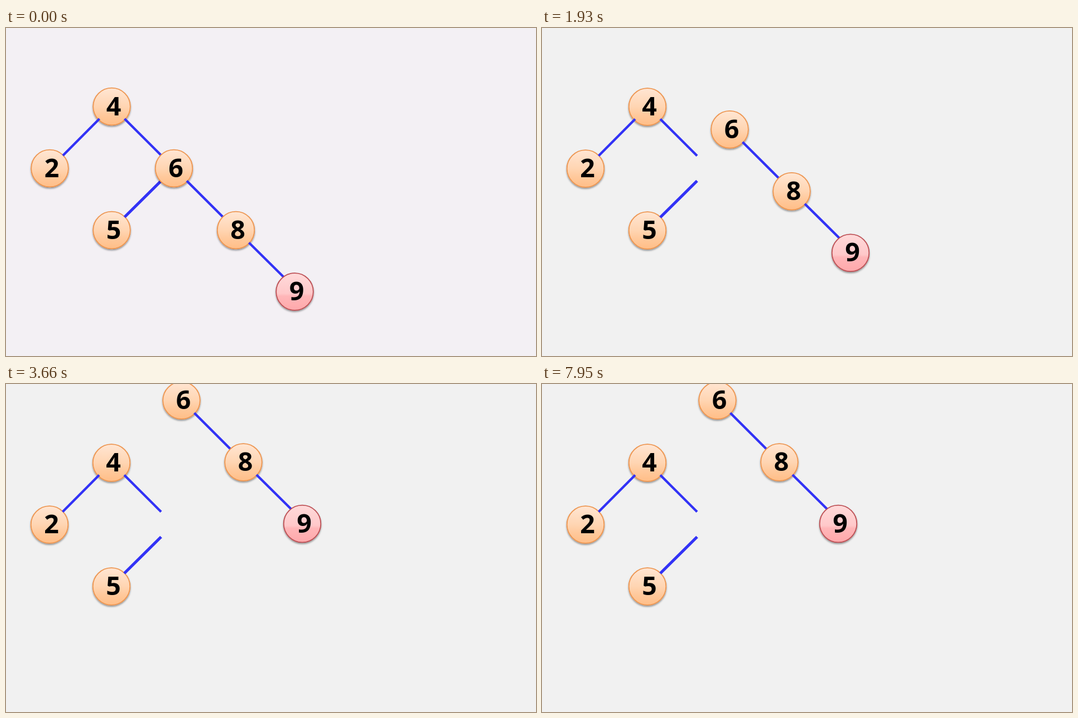
Recreate the animation shown at these times as an HTML page. Size 950 by 589 pixels, loop 7990 ms.

```html
<!DOCTYPE html>
<html lang="en">
<head>
<meta charset="utf-8">
<title>Tree rotation</title>
<style>
  html, body { margin: 0; width: 100%; height: 100%; overflow: hidden; background: #f1f1f1; }
  svg { display: block; width: 100vw; height: 100vh; }
  text { font: bold 46.5px "Open Sans", "Noto Sans", sans-serif; text-anchor: middle; }
</style>
</head>
<body>
<svg id="stage" viewBox="0 0 950 589">
  <defs>
    <linearGradient id="peach" x1="0" y1="0" x2="0" y2="1">
      <stop offset="0" stop-color="#ffe6d3"/>
      <stop offset=".5" stop-color="#ffd5b2"/>
      <stop offset=".72" stop-color="#ffc99c"/>
      <stop offset="1" stop-color="#ffbe87"/>
    </linearGradient>
    <linearGradient id="pink" x1="0" y1="0" x2="0" y2="1">
      <stop offset="0" stop-color="#ffdada"/>
      <stop offset=".55" stop-color="#ffc8c9"/>
      <stop offset=".62" stop-color="#ffb6b8"/>
      <stop offset="1" stop-color="#ffa8ab"/>
    </linearGradient>
    <filter id="shadow" x="-20%" y="-20%" width="140%" height="150%">
      <feDropShadow dx="0" dy="2.2" stdDeviation="1.7" flood-color="#000" flood-opacity=".4"/>
    </filter>
  </defs>
  <rect id="back" width="950" height="589"/>
  <g id="tree">
    <g id="fixed"></g>
    <g id="moving"></g>
  </g>
</svg>
<script>
const LOOP = 7990;
const SETTLE = [100, 940];
const BACK = [[243, 240, 244], [241, 241, 241]];
// time, x shift, y shift of the dragged branch
const PATH = [
  [1270, 0, 0], [1500, 9, -4], [1730, 35, -24], [1930, 36, -70],
  [2260, 40.2, -152.7], [2530, 26, -212], [2720, 14.5, -222.3], [2820, 14, -223]
];

const byId = id => document.getElementById(id);
const fixed = byId("fixed"), moving = byId("moving"), tree = byId("tree"), back = byId("back");

function add(parent, tag, attrs) {
  const el = document.createElementNS("http://www.w3.org/2000/svg", tag);
  for (const key in attrs) el.setAttribute(key, attrs[key]);
  return parent.appendChild(el);
}

function node(parent, label, x, y, fill = "peach", stroke = "#ee954f") {
  add(parent, "circle", {
    cx: x, cy: y, r: 33.3, fill: `url(#${fill})`, stroke,
    "stroke-width": 1.8, filter: "url(#shadow)"
  });
  add(parent, "text", { x: x + 3.5, y: y + 15.5 }).textContent = label;
}

function edge(parent, x1, y1, x2, y2, width = 4.4) {
  add(parent, "line", { x1, y1, x2, y2, stroke: "#3232f6", "stroke-width": width });
}

node(fixed, "4", 189, 141.5);
node(fixed, "2", 78, 252.5);
node(fixed, "5", 189, 363.5);
edge(fixed, 167, 163.5, 101.5, 229.5);
edge(fixed, 212, 163.5, 278, 229.5);
edge(fixed, 212, 340, 278, 274.5, 5.2);

node(moving, "6", 300.5, 252.5);
edge(moving, 323.5, 275, 389, 340.5);
node(moving, "8", 411.5, 363.5);
edge(moving, 435, 386, 498, 448.5);
node(moving, "9", 517, 474, "pink", "#bd5054");

// Slope at a key; the branch rests at both ends
function slope(i, axis) {
  if (i === 0 || i === PATH.length - 1) return 0;
  const a = PATH[i - 1], b = PATH[i + 1];
  return (b[axis] - a[axis]) / (b[0] - a[0]);
}

function shift(t, axis) {
  const last = PATH.length - 1;
  if (t <= PATH[0][0]) return 0;
  if (t >= PATH[last][0]) return PATH[last][axis];
  const i = PATH.findIndex(p => p[0] > t) - 1;
  const a = PATH[i], b = PATH[i + 1];
  const span = b[0] - a[0], u = (t - a[0]) / span, v = 1 - u;
  return a[axis] * v * v * (1 + 2 * u) + b[axis] * u * u * (3 - 2 * u)
    + span * u * v * (v * slope(i, axis) - u * slope(i + 1, axis));
}

function draw(t) {
  const k = Math.min(1, Math.max(0, (t - SETTLE[0]) / (SETTLE[1] - SETTLE[0])));
  const off = (1 - k) / 2;
  const rgb = BACK[0].map((c, i) => Math.round(c + (BACK[1][i] - c) * k));
  back.setAttribute("fill", `rgb(${rgb})`);
  tree.setAttribute("transform", `translate(${off} ${-off})`);
  moving.setAttribute("transform", `translate(${shift(t, 1)} ${shift(t, 2)})`);
}

const start = performance.now();
function tick() {
  draw((performance.now() - start) % LOOP);
  requestAnimationFrame(tick);
}
tick();
</script>
</body>
</html>
```
